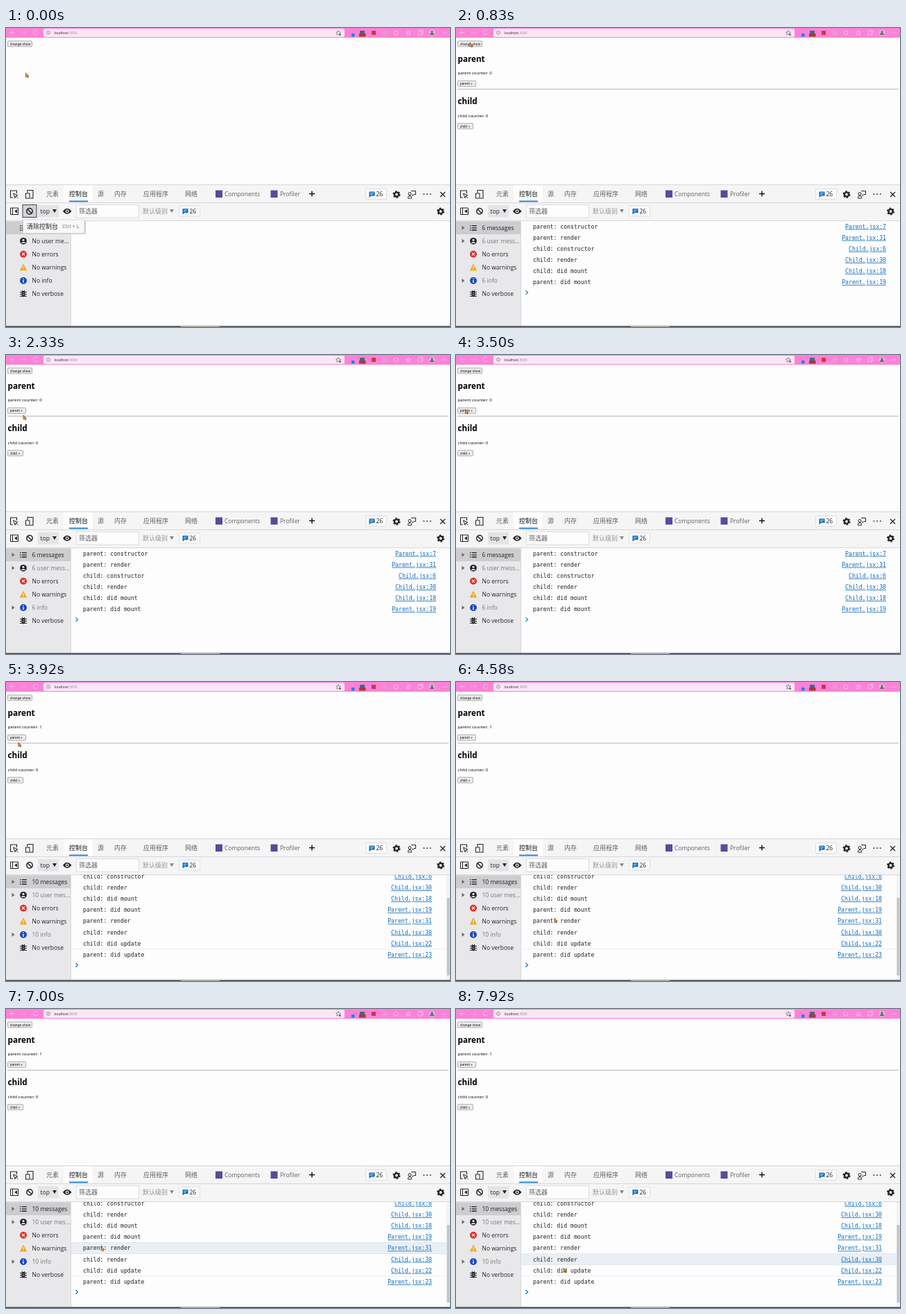
An HTML page that plays this animation: 640 by 432 pixels, repeating every 8000 ms.

```html
<!DOCTYPE html>
<html lang="zh">
<head>
<meta charset="utf-8">
<style>
  html, body { margin: 0; width: 100%; height: 100%; overflow: hidden; background: #fdfdfd; }
  svg { display: block; width: 100vw; height: 100vh; }
  text { font-family: "Open Sans", "Noto Sans CJK SC", "Noto Sans CJK", sans-serif; white-space: pre; }
  .mono { font-family: "DejaVu Sans Mono", monospace; }
  .arial { font-family: "Liberation Sans", sans-serif; }
  .link { text-decoration: underline; text-anchor: end; }
</style>
</head>
<body>
<svg id="stage" viewBox="0 0 640 432"></svg>
<script>
const LOOP = 8000, SHOW = 830, COUNT = 3620;
const INK = '#222', GREY = '#777', PAGE = '#fdfdfd', BAR = '#f5f5f6', SIDE = '#e8e8ea', BORDER = '#cfcfd6';
const ROW = 16.15, FIRST = 286.6;

const text = (x, y, s, size = 8.5, fill = INK, attrs = '') =>
  `<text x="${x}" y="${y + size * .36}" font-size="${size}" fill="${fill}" ${attrs}>${s}</text>`;
const rect = (x, y, w, h, fill, attrs = '') =>
  `<rect x="${x}" y="${y}" width="${w}" height="${h}" fill="${fill}" ${attrs}/>`;
const circle = (x, y, r, fill, attrs = '') => `<circle cx="${x}" cy="${y}" r="${r}" fill="${fill}" ${attrs}/>`;
const line = (d, stroke = INK, width = 1, attrs = '') =>
  `<path d="${d}" fill="none" stroke="${stroke}" stroke-width="${width}" ${attrs}/>`;
const shape = (d, fill = INK) => `<path d="${d}" fill="${fill}"/>`;
const group = (id, body) => `<g id="${id}">${body}</g>`;

const gear = (x, y) => circle(x, y, 3.1, 'none', `stroke="${INK}" stroke-width="2.4"`) +
  circle(x, y, 4.7, 'none', `stroke="${INK}" stroke-width="1.6" stroke-dasharray="2.46 2.46"`);
const badge = (x, y) => rect(x, y, 30, 15, '#fafafa', 'stroke="#d8d8dc" stroke-width=".8" rx="1"') +
  shape(`M${x + 5} ${y + 4}h8v6h-5l-3 2.5z`, '#0b6cc4') + line(`M${x + 6.5} ${y + 6}h5m-5 2h3.5`, '#fff', .7) +
  text(x + 15, y + 7.7, '26');
const button = (y, w, label) => rect(2.5, y - 4, w, 8, '#ededed', 'stroke="#8c8c90" stroke-width=".7" rx="1"') +
  text(5.8, y, label, 5, '#111', 'class="arial"');
const listIcon = y => line(`M20 ${y - 3.2}h1.5m1.3 0h7M20 ${y}h1.5m1.3 0h7M20 ${y + 3.2}h1.5m1.3 0h7`, INK, 1.3);
const arrow = y => shape(`M8.5 ${y - 3}l4 3l-4 3z`, '#6a6a6e');
const star = x => `M${x} 3.5l1 2.4 2.5.1-2 1.6.7 2.5-2.2-1.4-2.2 1.4.7-2.5-2-1.6 2.5-.1z`;

const PALE = '#ffc8ee';
const browserBar = rect(0, 0, 640, 14, '#fb82d8') +
  line('M13 6.5H6m3-3l-3 3l3 3', PALE, .8) + line('M22 6.5h7m-3-3l3 3l-3 3', '#fda6e4', .8) +
  line('M45.5 4.5a3.3 3.3 0 1 0 .6 2.5', PALE, .8) +
  rect(54, 1, 434, 12, '#fce6f6', 'rx="2"') +
  circle(61, 6.7, 2.6, 'none', 'stroke="#6d6070" stroke-width=".6"') + line('M61 6v2.2m0-3.3v.5', '#6d6070', .6) +
  text(69.5, 6.8, 'localhost<tspan fill="#97869a">:3000</tspan>', 4.9) +
  line(star(479), '#6d6070', .7) + circle(481.5, 9.5, 1.6, '#4a8a58') +
  rect(498, 8, 4.5, 4.5, '#2b7de0') + rect(510, 4, 7, 4, '#3d6c80') + rect(509, 8, 9.5, 4.5, '#a83a30') +
  rect(527, 4, 6, 6, '#d0344c') + rect(543, 4, 6, 6, '#e89ad0') +
  circle(562, 7, 3, 'none', `stroke="${PALE}" stroke-width=".8"`) + line(star(580), PALE, .8) +
  line('M594 4h5v6h-5zM596 3h5v6', PALE, .8) +
  circle(614, 7, 4.3, '#cfc8d0') + circle(614, 5.5, 1.6, '#6d6468') + shape('M611 10a3 3 0 0 1 6 0z', '#6d6468') +
  line('M627.5 7h7', '#ffd9f3', 1.1, 'stroke-dasharray="1.3 1.5"');

const counters = text(2.5, 44.5, 'parent', 11.7, '#000', 'font-weight="700"') +
  `<text id="parentCount" x="2.5" y="67.2" font-size="6.1" fill="#000"></text>` + button(80.3, 26, 'parent +') +
  line('M2 88.3h636', '#b4b4bc', 1) +
  text(2.5, 105.5, 'child', 11.7, '#000', 'font-weight="700"') +
  text(2.5, 126.5, 'child counter: 0', 6.1, '#000') + button(141.8, 22, 'child +');

const tabs = [[58, '元素'], [132, '源'], [156, '内存'], [198, '应用程序'], [258, '网络']];
const tabBar = rect(0, 227, 640, 51.5, BAR) + line('M0 226.5h640M0 252.5h640M0 278.5h640', BORDER, .8) +
  rect(83, 227, 42, 25, PAGE) + rect(91, 249.5, 27, 1.8, '#1a78d0') +
  line('M10 245H6.5v-10h9v4', INK, 1.1) + line('M10.5 239l6.5 2.700-2.800 1.100-1.100 2.900zM14.200 242.800l3 3', INK, 1) +
  line('M31 238v-3.5h8V246h-4', INK, 1.1) + rect(28.5, 239, 5.5, 7, BAR, `stroke="${INK}"`) +
  tabs.map(([x, s]) => text(x, 240, s, 9, '#606066')).join('') + text(91, 240, '控制台', 9, '#111') +
  rect(302, 234.5, 10, 10.5, '#5a4a9c') + text(315, 240, 'Components', 8.5, '#606066') +
  rect(381.5, 234.5, 10, 10.5, '#5a4a9c') + text(395, 240, 'Profiler', 8.5, '#606066') +
  line('M437 239.5h8m-4-4v8', '#111', 1.4) + badge(518.5, 232.5) + gear(563, 240.5) +
  circle(582, 239.5, 2, 'none', `stroke="${INK}"`) +
  line('M579.5 246v-1.5q0-2 2.5-2t2.5 2V246zM584 235.5h6.5v5H588l-2 2v-2') +
  line('M601.5 240h12', INK, 1.7, 'stroke-dasharray="1.7 3"') + line('M626 237l7 7m0-7l-7 7', INK, 1.3);

const toolBar = line('M6.5 260h11v9.5h-11zM9.5 260v9.5') + shape('M16 262v5.5l-4-2.75z') +
  group('focus', rect(24, 255.5, 20, 18, '#d4d4d8', 'stroke="#404044"')) +
  circle(34, 264.7, 4.2, 'none', `stroke="${INK}" stroke-width="1.5"`) + line('M31 261.8l6 6', INK, 1.5) +
  rect(46, 256, 30, 17.5, '#e4e4e6') + text(49.5, 264.8, 'top') + shape('M67 262h6l-3 5z') +
  shape('M82 264.7q6-8 12.5 0q-6.5 8-12.5 0z') + circle(88.2, 264.7, 2.5, BAR) + circle(88.2, 264.7, 1.3, INK) +
  rect(101.5, 255.5, 90, 18.5, PAGE, 'stroke="#dcdce0"') + text(105, 265, '筛选器', 9, '#606066') +
  text(197, 265, '默认级别', 9, '#94949a') + shape('M236 262h6l-3 5z', '#85858a') +
  badge(249.5, 257) + gear(626.5, 265);

const sideBar = rect(0, 279, 93, 151.5, SIDE) + rect(0, 279.5, 93, 18.5, '#cdcdd0') +
  line('M93.5 279v151.5', BORDER, .8) + listIcon(288.8) +
  circle(25, 307.8, 4.9, INK) + circle(25, 306.3, 1.6, SIDE) + shape('M21.8 311a3.3 2.5 0 0 1 6.4 0z', SIDE) +
  circle(25, 326.7, 5, '#e0302c') + line('M23 324.7l4 4m0-4l-4 4', '#fff', 1.1) +
  shape('M25 340.5l5.2 10h-10.4z', '#f0a820') + line('M25 344v3.2m0 1v1.2', '#fff', 1) +
  circle(25, 365, 5, '#1f48c0') + line('M25 361.7v1.4m0 1v4', '#fff', 1.4) +
  rect(22.5, 380, 5, 8.5, INK, 'rx="2.4"') +
  line('M20 381.5h10m-10 3h10m-10 3h10M23 379l1 2m3-2l-1 2', INK, 1.1) +
  line('M23.7 383h2.6m-2.6 2.5h2.6', SIDE, .7) +
  text(37.5, 327, 'No errors') + text(37.5, 346, 'No warnings') + text(37.5, 384, 'No verbose') +
  group('arrows', arrow(288.8) + arrow(307.8) + arrow(365)) +
  [289, 308, 365].map((y, i) => `<text id="side${i}" x="37.5" y="${y + 3.1}" font-size="8.5"></text>`).join('');

const logs = [
  ['parent: constructor', 'Parent.jsx:7'], ['parent: render', 'Parent.jsx:31'],
  ['child: constructor', 'Child.jsx:6'], ['child: render', 'Child.jsx:30'],
  ['child: did mount', 'Child.jsx:18'], ['parent: did mount', 'Parent.jsx:19'],
  ['parent: render', 'Parent.jsx:31'], ['child: render', 'Child.jsx:30'],
  ['child: did update', 'Child.jsx:22'], ['parent: did update', 'Parent.jsx:23']
];
const logRow = ([message, link], i) => group('log' + i,
  text(111, FIRST + ROW * i, message, 8.17, INK, 'class="mono"') +
  text(620, FIRST + ROW * i, link, 8.17, '#0f6cbd', 'class="mono link"'));

const consolePane = `<g clip-path="url(#pane)">` +
  group('hover', rect(94, -8, 542, 16, '#e9eff5') + line('M94 -8h542M94 8h542', '#d6e0ea', .7)) +
  group('logs', logs.map(logRow).join('')) +
  group('prompt', line('M100.5 -3l3 3l-3 3', '#1f6fd0', 1.2)) +
  group('scrollbar', line('M94 386h541', '#e4e4ec', .7) +
    rect(635, 279, 5, 152, '#f3f3f4') + rect(635.5, 312, 4, 112, '#c4c4c8')) + '</g>';

const tooltip = group('tooltip', rect(26, 279, 89, 19, '#cfcfd2') +
  rect(24.5, 277, 88.5, 19.5, '#f8f8f8', 'stroke="#cfcfd2" stroke-width=".7"') +
  text(30, 286.7, '清除控制台', 9) + text(81, 286.7, 'Ctrl + L', 7.6, '#707074'));

const stage = document.getElementById('stage');
stage.innerHTML = `<defs><clipPath id="pane"><rect x="94" y="279" width="546" height="151.5"/></clipPath></defs>` +
  rect(0, 0, 640, 432, PAGE) + browserBar + button(22.8, 35, 'change show') +
  group('page', counters) + tabBar + toolBar + sideBar + consolePane + tooltip +
  rect(0, 430.5, 640, 1.5, '#45484c') + rect(252, 430.5, 56, 1.5, '#b4b4a4') +
  group('cursor', `<path d="M0 0v6l1.5-1.2 1.2 2.2 1-.6-1-2.1h1.7z" fill="#e8a020" stroke="#4c3c20" stroke-width=".6"/>`);

const el = id => document.getElementById(id);
const show = (id, on) => el(id).setAttribute('display', on ? 'inline' : 'none');
const move = (id, x, y) => el(id).setAttribute('transform', `translate(${x} ${y})`);
const setText = (id, s, fill = INK) => { el(id).textContent = s; el(id).setAttribute('fill', fill); };

// Pointer stops: time, x, y
const stops = [[0, 28.5, 65], [200, 28.5, 65], [670, 20, 21], [880, 20, 21], [1170, 43.5, 56], [1400, 43.5, 57],
  [2330, 25, 87], [2800, 23, 86], [3400, 13.5, 78.5], [3850, 13.5, 78.5], [4500, 142, 341],
  [4900, 141, 342], [5900, 139, 343], [7000, 137, 343], [7300, 138, 344], [7600, 150, 359], [7900, 155, 374], [8000, 155, 374]];

function pointer(t) {
  const i = stops.findIndex((s, k) => k && t <= s[0]);
  const [t0, x0, y0] = stops[i - 1], [t1, x1, y1] = stops[i];
  const p = (t - t0) / (t1 - t0), e = p * p * (3 - 2 * p);
  return [x0 + (x1 - x0) * e, y0 + (y1 - y0) * e];
}

function draw(t) {
  const mounted = t >= SHOW, counted = t >= COUNT;
  const count = counted ? 10 : mounted ? 6 : 0;
  const scroll = counted ? 38 : 0;
  show('tooltip', t < 80);
  show('focus', t < SHOW);
  show('page', mounted);
  show('arrows', mounted);
  show('scrollbar', counted);
  setText('parentCount', `parent counter: ${counted ? 1 : 0}`, '#000');
  setText('side0', `${count || 'No'} messages`);
  setText('side1', count ? `${count} user mes${counted ? '' : 's'}...` : 'No user me...', count ? GREY : INK);
  setText('side2', `${count || 'No'} info`, count ? GREY : INK);
  logs.forEach((_, i) => show('log' + i, i < count));
  move('logs', 0, -scroll);
  stage.querySelectorAll('.link').forEach(a => a.setAttribute('x', counted ? 614 : 620));
  move('prompt', 0, counted ? 409 : mounted ? 382.3 : 286.6);
  show('hover', t >= 6900);
  move('hover', 0, FIRST + ROW * (t < 7550 ? 6 : 7) - scroll);
  move('cursor', ...pointer(t));
}

function tick() {
  draw(performance.now() % LOOP);
  requestAnimationFrame(tick);
}
tick();
</script>
</body>
</html>
```
